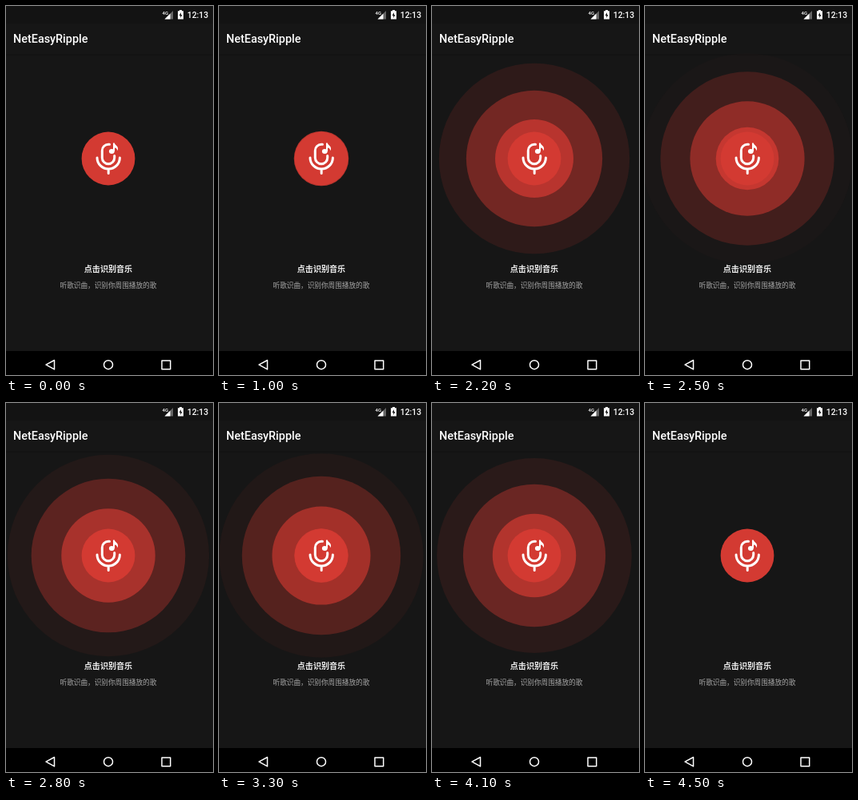
These frames come from a looping animation (259x462 px, 5500 ms). An HTML page:

```html
<!DOCTYPE html>
<html lang="zh-CN">
<head>
<meta charset="utf-8">
<title>NetEasyRipple</title>
<style>
  html, body { margin: 0; width: 100%; height: 100%; overflow: hidden; background: #161616; }
  svg { display: block; width: 100%; height: 100%; }
  text { fill: #fff; font-family: Roboto, "Noto Sans CJK SC", "Noto Sans CJK", sans-serif; }
  .latin { font-weight: 500; }
  .center { text-anchor: middle; }
  .line { fill: none; stroke: #fff; stroke-linecap: round; stroke-linejoin: round; }
</style>
</head>
<body>
<svg viewBox="0 0 259 462" preserveAspectRatio="none">
  <rect width="259" height="462" fill="#161616"/>
  <rect width="259" height="22" fill="#131313"/>
  <rect y="60.5" width="259" height="1" fill="#101010"/>

  <g id="rings" fill="#d33a32"></g>
  <circle cx="128" cy="191" r="33.4" fill="#d33a32"/>

  <!-- microphone with a note -->
  <g class="line" stroke-width="3">
    <path d="M129.5 173.3h-1.5a7.7 7.7 0 0 0-7.7 7.7v9a7.7 7.7 0 0 0 15.4 0v-2.5"/>
    <path d="M114 190a14.2 14 0 0 0 28.4 0M128.2 204.5v5"/>
  </g>
  <ellipse cx="132.3" cy="182" rx="3.4" ry="3" fill="#fff"/>
  <path d="M134 182v-10.5h1.8c.5 3 4.3 3.3 4.3 7.2 0 1-.3 1.800-.8 2.500-.2-2.600-1.700-3.400-3.300-3.700v4.500z" fill="#fff"/>

  <!-- status bar -->
  <text class="latin" x="195.500" y="10.500" font-size="6">4G</text>
  <path d="M209 6v10.500h-10.500z" fill="#666"/>
  <path d="M205.500 9.500v7h-7z" fill="#fff"/>
  <path d="M217 5h3v1.200h2v10.300h-7V6.200h2z" fill="#fff"/>
  <path d="M219 8l-2.300 4h1.500v3l2.300-4h-1.500z" fill="#161616"/>
  <text class="latin" x="226.800" y="14.800" font-size="10.400">12:13</text>

  <text class="latin" x="9" y="45.700" font-size="14.400">NetEasyRipple</text>
  <text class="center" x="128" y="333" font-size="10.070" font-weight="700" style="fill:#eee">点击识别音乐</text>
  <text class="center" x="128" y="352.600" font-size="8.630" style="fill:#a8a8a8">听歌识曲，识别你周围播放的歌</text>

  <!-- navigation bar -->
  <rect y="432" width="259" height="30" fill="#000"/>
  <g class="line" stroke-width="1.500">
    <path d="M60.500 443.500v11.400l-10.500-5.700z"/>
    <circle cx="128" cy="449.200" r="5.500"/>
    <rect x="195" y="444" width="10.700" height="10.700"/>
  </g>
</svg>
<script>
const LOOP = 5500, STEP = 100, START = 1000, STOP = 4500;
const FIRST = 687, GAP = 463, LIFE = 2000, COUNT = 8;
const R_MIN = 28, R_MAX = 134, ALPHA = 0.9;

const group = document.getElementById('rings');
const rings = Array.from({ length: COUNT }, () => {
  const ring = document.createElementNS(group.namespaceURI, 'circle');
  ring.setAttribute('cx', 128);
  ring.setAttribute('cy', 191);
  return group.appendChild(ring);
});

const ease = p => (1 - Math.cos(Math.PI * p)) / 2;

function draw(time) {
  const t = Math.floor((time % LOOP) / STEP) * STEP;
  const playing = t >= START && t < STOP;
  rings.forEach((ring, i) => {
    const p = (t - FIRST - i * GAP) / LIFE;
    const visible = playing && p > 0 && p < 1;
    const k = visible ? ease(p) : 1;
    ring.setAttribute('r', R_MIN + (R_MAX - R_MIN) * k);
    ring.setAttribute('opacity', ALPHA * (1 - k));
  });
}

const origin = performance.now();
function tick() {
  draw(performance.now() - origin);
  requestAnimationFrame(tick);
}
tick();
</script>
</body>
</html>
```
